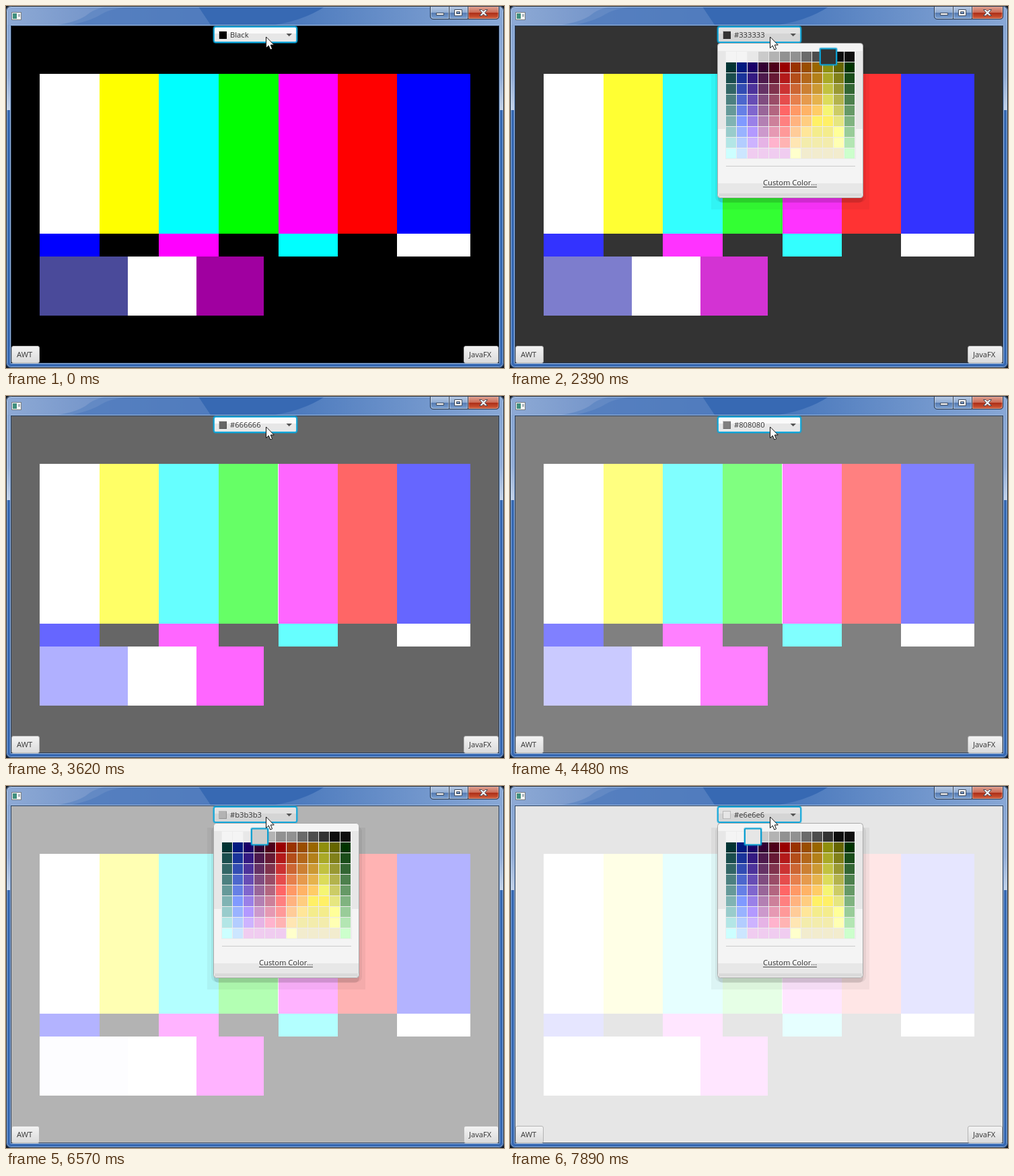
Write an HTML page that moves like this. It is 740x539 px and loops after 8000 ms.

```html
<!DOCTYPE html>
<html lang="en">
<head>
<meta charset="utf-8">
<title>Color bars</title>
<style>
  html, body { margin: 0; width: 100%; height: 100%; overflow: hidden; background: #10151c; }
  svg { display: block; width: 740px; height: 539px; }
  text { font: 11.2px "Open Sans", "Noto Sans", sans-serif; fill: #333; }
  .crisp { shape-rendering: crispEdges; }
</style>
</head>
<body>
<svg viewBox="0 0 740 539">
  <defs>
    <linearGradient id="sheen">
      <stop offset="0" stop-color="#8eaad5"/><stop offset=".4" stop-color="#7797cb"/>
      <stop offset="1" stop-color="#5f88c3"/>
    </linearGradient>
    <linearGradient id="sheenRight">
      <stop offset="0" stop-color="#4474ba"/><stop offset="1" stop-color="#89a8d6"/>
    </linearGradient>
    <linearGradient id="side" x2="0" y2="1">
      <stop offset="0" stop-color="#86a5d3"/><stop offset=".6" stop-color="#92add8"/>
      <stop offset="1" stop-color="#c3d2e8"/>
    </linearGradient>
    <linearGradient id="button" x2="0" y2="1">
      <stop offset="0" stop-color="#f3f3f3"/><stop offset="1" stop-color="#dadada"/>
    </linearGradient>
    <linearGradient id="glass" x2="0" y2="1">
      <stop offset="0" stop-color="#b9cbe4"/><stop offset=".48" stop-color="#8fabd2"/>
      <stop offset=".5" stop-color="#5479b0"/><stop offset="1" stop-color="#7fa4d4"/>
    </linearGradient>
    <linearGradient id="close" x2="0" y2="1">
      <stop offset="0" stop-color="#e0a596"/><stop offset=".48" stop-color="#cb6a55"/>
      <stop offset=".5" stop-color="#ac2c15"/><stop offset="1" stop-color="#d2623f"/>
    </linearGradient>
    <clipPath id="window"><rect width="740" height="539" rx="7"/></clipPath>
  </defs>

  <!-- Window frame -->
  <g clip-path="url(#window)">
    <rect width="740" height="539" fill="#3769b3"/>
    <path d="M0 0H285L305 30H0Z" fill="url(#sheen)"/>
    <path d="M60 30Q105 26 122 12T178 0H285L305 30Z" fill="#5580bf" opacity=".55"/>
    <path d="M88 30Q125 23 142 12T205 0H285L305 30Z" fill="#4877bb" opacity=".5"/>
    <path d="M385 30Q440 24 475 0H740V30Z" fill="url(#sheenRight)"/>
    <rect y="28" width="8" height="127" fill="url(#side)"/>
    <rect x="732" y="28" width="8" height="127" fill="url(#side)"/>
    <rect x="1.5" y="1.5" width="737" height="536" rx="6" fill="none" stroke="#c5dbf3" stroke-opacity=".75"/>
    <rect x=".5" y=".5" width="739" height="538" rx="7" fill="none" stroke="#17202d"/>
  </g>
  <rect x="6.5" y="28.5" width="727" height="504" rx="1" fill="none" stroke="#9fbbe0"/>
  <rect x="7.5" y="29.5" width="725" height="502" fill="none" stroke="#233a5c"/>
  <g class="crisp">
    <rect x="8" y="9" width="15" height="12" fill="#777d82"/>
    <rect x="9" y="10" width="13" height="10" fill="#f3f5f5"/>
    <rect x="10" y="11" width="6" height="8" fill="#3f8f7d"/>
    <rect x="18" y="12" width="3" height="4" fill="#a9b4bb"/>
  </g>
  <g stroke="#26364d">
    <path d="M630.5 .5H658.5V19.5H635Q630.5 19.5 630.5 15Z" fill="url(#glass)"/>
    <path d="M658.5 .5H686.5V19.5H658.5Z" fill="url(#glass)"/>
    <path d="M686.5 .5H732.5V15Q732.5 19.5 728 19.5H686.5Z" fill="url(#close)"/>
  </g>
  <path d="M631.5 1V15Q632 18.5 635 18.5H657.5V1M659.5 1V18.5H685.5V1M687.5 1V18.5H728Q731.5 18 731.5 15V1" fill="none" stroke="#fff" stroke-opacity=".4"/>
  <g fill="#fff" stroke="#424c5c">
    <rect x="639.5" y="10.5" width="11" height="3"/>
    <path d="M666.5 5.5H677.5V14.5H666.5ZM669.5 8.5V11.5H674.5V8.5Z"/>
    <path d="M703.5 5.5H707L709.5 8L712 5.5H715.5L711.5 10L715.5 14.5H712L709.5 12L707 14.5H703.5L707.5 10Z"/>
  </g>

  <g id="bars" class="crisp"></g>

  <g fill="url(#button)" stroke="#b4b4b4">
    <rect x="8.5" y="506.5" width="41" height="25" rx="2.5"/>
    <rect x="680.5" y="506.5" width="51" height="25" rx="2.5"/>
  </g>
  <text x="16" y="523">AWT</text>
  <text x="688" y="523">JavaFX</text>

  <!-- Colour picker -->
  <rect x="307.5" y="29.5" width="126" height="26" rx="4" fill="none" stroke="#039ed3" stroke-opacity=".4"/>
  <rect id="comboTop" x="309" y="31" width="123" height="23" rx="2"/>
  <rect id="comboBottom" x="310" y="41" width="121" height="12"/>
  <rect x="309" y="31" width="123" height="23" rx="2.5" fill="none" stroke="#12a8dc" stroke-width="1.8"/>
  <rect id="swatch" class="crisp" x="316.5" y="37.5" width="11" height="11" stroke="#000" stroke-opacity=".18"/>
  <text id="label" x="333" y="47"></text>
  <path d="M416.5 41H425L420.7 45.2Z" fill="#555"/>

  <g id="popup">
    <path d="M299 62H534V303H299Z" opacity=".045"/>
    <rect x="305" y="60" width="224" height="232" rx="8" opacity=".06"/>
    <rect x="309" y="60" width="216" height="233" rx="7" opacity=".1"/>
    <rect x="308.5" y="55.5" width="216" height="230" rx="4" fill="#f4f4f4" stroke="#a9a9a9"/>
    <g class="crisp">
      <rect x="309" y="67" width="215" height="116" fill="#e7e7e7"/>
      <rect x="309" y="264" width="215" height="15" fill="#e7e7e7"/>
      <rect x="310" y="279" width="213" height="5" fill="#dadada"/>
      <rect x="320" y="67" width="194" height="161" fill="#ececec"/>
      <rect x="321" y="238" width="192" height="1" fill="#cbcbcb"/>
    </g>
    <g id="palette" class="crisp"></g>
    <text x="376" y="267">Custom Color...</text>
    <rect class="crisp" x="376" y="269" width="80" height="1" fill="#444"/>
    <g id="highlight">
      <rect x="-13.5" y="-13.5" width="27" height="27" rx="2" fill="none" stroke="#039ed3" stroke-opacity=".35"/>
      <rect id="chosen" x="-12" y="-12" width="24" height="24" rx="1" stroke="#0d9fd0" stroke-width="2"/>
    </g>
  </g>

  <path d="M386.5 46V62.5L390.3 59L392.8 65L395.6 63.8L393.2 58H398.3Z" fill="#fff" stroke="#111"/>
</svg>
<script>
const LOOP = 8000;
const byId = id => document.getElementById(id);

function addRect(parent, x, y, width, height, fill) {
  const rect = document.createElementNS("http://www.w3.org/2000/svg", "rect");
  const attributes = { x, y, width, height, fill };
  for (const name in attributes) rect.setAttribute(name, attributes[name]);
  parent.append(rect);
  return rect;
}

// Colour bars: every channel is raised by the picked grey level.
const WHITE = [255, 255, 255], YELLOW = [255, 255, 0], CYAN = [0, 255, 255], GREEN = [0, 255, 0];
const MAGENTA = [255, 0, 255], RED = [255, 0, 0], BLUE = [0, 0, 255], BLACK = [0, 0, 0];
const edges = [50, 139, 227, 316, 405, 493, 581, 690];
const bars = [];

function addRow(y, height, xs, colors) {
  colors.forEach((color, i) => bars.push({
    color, rect: addRect(byId("bars"), xs[i], y, xs[i + 1] - xs[i], height)
  }));
}
addRow(30, 501, [8, 732], [BLACK]);
addRow(101, 238, edges, [WHITE, YELLOW, CYAN, GREEN, MAGENTA, RED, BLUE]);
addRow(339, 34, edges, [BLUE, BLACK, MAGENTA, BLACK, CYAN, BLACK, WHITE]);
addRow(373, 88, [50, 181, 283, 383], [[74, 74, 154], WHITE, [160, 0, 160]]);
const seam = addRect(byId("bars"), 404, 101, 1, 238, "#fff");

// Palette: a grey row, then dark hues that lighten row by row.
const greys = [244, 244, 232, 202, 179, 145, 145, 106, 77, 51, 14, 14];
const hues = ["033", "01a80", "1a0068", "303", "4d001a", "900", "930", "994d00", "960", "8f8f0d", "660", "030"];
hues[1] = "001a80";
const paleYellows = { 6: "#fff066", 7: "#f4ec8c", 8: "#f3ecac", 9: "#f2ecce" };

const parseHex = hex => (hex.length === 3 ? [...hex].map(d => d + d) : hex.match(/../g)).map(h => parseInt(h, 16));

function paletteColor(column, row) {
  if (row === 0) return `rgb(${Array(3).fill(greys[column])})`;
  const yellowStart = row > 7 ? 7 : 8;
  if (row > 5 && column >= yellowStart && column < (row === 9 ? 11 : 10)) return paleYellows[row];
  if (row === 9 && column > 1 && column < 6) return "#f0ccf0";
  return `rgb(${parseHex(hues[column]).map(c => Math.min(255, Math.round(c + 25.5 * (row - 1))))})`;
}
for (let row = 0; row < 10; row++) {
  for (let column = 0; column < 12; column++) {
    addRect(byId("palette"), 321 + 16 * column, 68 + 16 * row, 15, 15, paletteColor(column, row));
  }
}

// Each pick: popup opens, next grey is hovered, grey is chosen.
const picks = [
  [290, 610, 910], [1460, 1650, 1840], [2390, 2620, 2860], [3240, 3430, 3620], [4080, 4280, 4480],
  [4860, 5050, 5240], [5640, 5840, 6040], [6410, 6570, 6720], [7120, 7320, 7520], [7890, LOOP, LOOP]
];
const greyLevel = step => Math.round(25.5 * step);
const greyHex = step => "#" + greyLevel(step).toString(16).padStart(2, "0").repeat(3);

function draw(time) {
  const step = picks.findIndex(pick => time < pick[2]);
  const [openAt, hoverAt] = picks[step];
  const level = greyLevel(step);
  const open = time >= openAt;
  const target = step + (time >= hoverAt ? 1 : 0);

  for (const { color, rect } of bars) {
    rect.setAttribute("fill", `rgb(${color.map(c => Math.min(255, c + level))})`);
  }
  seam.setAttribute("visibility", level >= 102 ? "visible" : "hidden");

  byId("comboTop").setAttribute("fill", open ? "#e2e2e2" : "#fafafa");
  byId("comboBottom").setAttribute("fill", open ? "#d5d5d5" : "#e7e7e7");
  byId("swatch").setAttribute("fill", greyHex(step));
  byId("label").textContent = step ? greyHex(step) : "Black";

  byId("popup").setAttribute("visibility", open ? "visible" : "hidden");
  byId("highlight").setAttribute("transform", `translate(${505 - 16 * target} 75.5)`);
  byId("chosen").setAttribute("fill", greyHex(target));
}

const start = performance.now();
function tick() {
  draw((performance.now() - start) % LOOP);
  requestAnimationFrame(tick);
}
tick();
</script>
</body>
</html>
```
